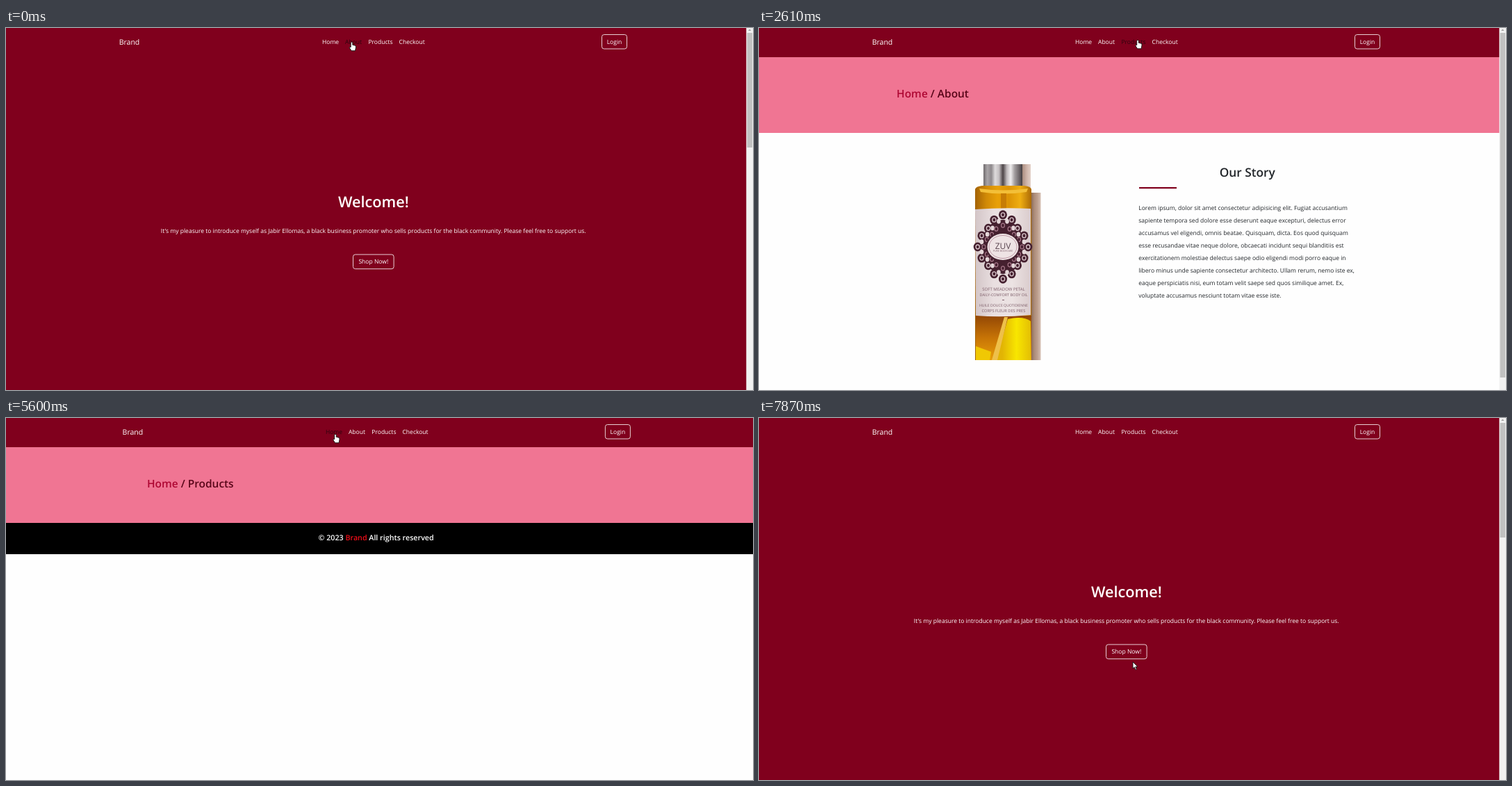
An HTML page with a canvas for the animation above (8000 ms loop, 1075x521 px).

```html
<!DOCTYPE html>
<html lang="en">
<head>
<meta charset="utf-8">
<title>Shop walkthrough</title>
<style>
  html, body { margin: 0; width: 100%; height: 100%; overflow: hidden; background: #fefefe; }
  canvas { display: block; }
</style>
</head>
<body>
<canvas id="stage" width="1075" height="521"></canvas>
<script>
const ctx = document.getElementById('stage').getContext('2d');
const W = 1075, H = 521, LOOP = 8000;
const WINE = '#80001d', PINK = '#f07593', PAPER = '#fefefe', DARK = '#2b040d';
const BODY = 8.52;

// Pages: start time, kind, colour of the hovered link while it fades, fade end
const pages = [
  { at: 0, kind: 'home', fade: DARK, until: 0 },
  { at: 500, kind: 'about', fade: '#b5a1a7', until: 640 },
  { at: 3170, kind: 'products', fade: '#43202a', until: 3410 },
  { at: 5900, kind: 'home', fade: '#a58d94', until: 6020 }
];

// Pointer path: time, x, y
const path = [
  [0, 497.5, 20], [640, 497.5, 20], [1540, 680, 112], [2610, 545, 17],
  [3276, 545, 17], [4230, 763, 91], [5170, 511, 47], [5600, 474, 23],
  [6415, 474, 23], [7480, 565, 250], [7870, 538, 351], [8000, 538, 351]
];

// Spans in which the screen is refreshed: start, end, steps
const spans = [
  [500, 1500, 8], [1650, 2610, 8], [3410, 4080, 6], [4230, 5170, 8],
  [5320, 5600, 3], [6550, 7480, 8], [7600, 7870, 3]
];

const links = [['Home', 455, 24], ['About', 488, 24], ['Products', 521.4, 35], ['Checkout', 565.6, 37]];

const story = [
  'Lorem ipsum, dolor sit amet consectetur adipisicing elit. Fugiat accusantium',
  'sapiente tempora sed dolore esse deserunt eaque excepturi, delectus error',
  'accusamus vel eligendi, omnis beatae. Quisquam, dicta. Eos quod quisquam',
  'esse recusandae vitae neque dolore, obcaecati incidunt sequi blanditiis est',
  'exercitationem molestiae delectus saepe odio eligendi modi porro eaque in',
  'libero minus unde sapiente consectetur architecto. Ullam rerum, nemo iste ex,',
  'eaque perspiciatis nisi, eum totam velit saepe sed quos similique amet. Ex,',
  'voluptate accusamus nesciunt totam vitae esse iste.'
];

const hand = new Path2D('M-1.3 1.2Q0-.9 1.3 1.2V4.3L5 5.2Q6.2 5.7 6 8L5 12.8H-.4L-3 8.8Q-3.7 6.8-1.3 7.6Z');
const arrow = new Path2D('M0 0V9.6L2.2 7.6L3.8 11.4L5.4 10.7L3.8 7H6.9Z');

function rect(x, y, w, h, color) {
  ctx.fillStyle = color;
  ctx.fillRect(x, y, w, h);
}

function shape(d, color) {
  ctx.fillStyle = color;
  ctx.fill(new Path2D(d));
}

function ellipse(x, y, rx, ry, color, line) {
  ctx.beginPath();
  ctx.ellipse(x, y, rx, ry, 0, 0, Math.PI * 2);
  if (line) {
    ctx.strokeStyle = color;
    ctx.lineWidth = line;
    ctx.stroke();
  } else {
    ctx.fillStyle = color;
    ctx.fill();
  }
}

function blend(x0, y0, x1, y1, ...colors) {
  const g = ctx.createLinearGradient(x0, y0, x1, y1);
  colors.forEach((c, i) => g.addColorStop(i / (colors.length - 1), c));
  return g;
}

// Returns the x at which the text ends
function text(str, x, y, color = '#fff', size = BODY, weight = 400, align = 'left') {
  ctx.font = `${weight} ${size}px "Open Sans", "Noto Sans", sans-serif`;
  ctx.textAlign = align;
  ctx.fillStyle = color;
  ctx.fillText(str, x, y);
  return x + ctx.measureText(str).width;
}

function button(label, x, y, w, h) {
  ctx.strokeStyle = '#f3e6e9';
  ctx.lineWidth = 0.9;
  ctx.beginPath();
  ctx.roundRect(x, y, w, h, 3.2);
  ctx.stroke();
  text(label, x + w / 2, y + h / 2 + 3.1, '#fff', BODY, 500, 'center');
}

function nav(shift, hovered, color) {
  rect(0, 0, W, 42, WINE);
  text('Brand', 162.7 + shift, 24, '#fff', 10.5, 500);
  for (const link of links) {
    text(link[0], link[1] + shift, 23.1, link === hovered ? color : '#fff', BODY, 500);
  }
  button('Login', 857.5 + shift, 9.5, 36, 20.5);
}

function banner(page, x) {
  rect(0, 42, W, 109, PINK);
  const end = text('Home', x, 100.4, '#ae0632', 15.45, 600);
  text(' / ' + page, end, 100.4, '#580518', 15.45, 600);
}

function scrollbar(bottom) {
  rect(1065.3, 0, 10, H, '#f1f1f1');
  rect(1066.5, 7, 7.5, bottom - 7, '#c1c1c1');
  shape('M1068 4L1070.2 1.6L1072.4 4Z', '#a0a0a0');
}

function ornament(cx, cy) {
  const plum = '#45202f', rose = '#a8788a';
  const ring = (rx, ry, turn, place) => {
    for (let i = 0; i < 16; i++) {
      const a = (i + turn) * Math.PI / 8, reach = 1 + 0.1 * Math.cos(4 * a);
      place(cx + rx * reach * Math.cos(a), cy + ry * reach * Math.sin(a));
    }
  };
  ring(33, 42, 0, (x, y) => ellipse(x, y, 6, 6.5, plum));
  ellipse(cx, cy, 31, 39, plum);
  ring(33, 42, 0, (x, y) => ellipse(x, y, 2.6, 3, '#d9c6cb', 1.3));
  ring(29, 35, 0.5, (x, y) => ellipse(x, y, 2.8, 3.4, '#e5d7d9'));
  ring(25, 28, 0, (x, y) => ellipse(x, y, 2.4, 3, rose, 1.2));
  ellipse(cx, cy, 24.5, 21.5, plum);
  ellipse(cx, cy, 22.5, 19, '#eee3e4');
  ellipse(cx, cy, 20, 16.5, rose, 0.7);
}

function bottle() {
  rect(379, 196, 12, 42, blend(379, 0, 391, 0, '#a98c7e', '#cdb3a8', '#e2d0c7'));
  rect(391, 237, 14.5, 241, blend(391, 0, 406, 0, '#85654f', '#ab8b79', '#bea08f', '#d9c4b8'));
  rect(323, 196, 56, 31, blend(323, 0, 379, 0, '#6f6b6d', '#a9a5a7', '#8d888b', '#dedbdc',
    '#c4bfc1', '#4c4447', '#bdb8ba', '#efedee', '#a39ea0', '#767073', '#453e41'));
  shape('M321 227H382Q391 228 392 232V478H311V232Q312 228 321 227Z',
    blend(311, 0, 392, 0, '#a36205', '#d18a06', '#e8a008', '#dc9306', '#efae12', '#ac6a06'));
  shape('M317 231Q352 236 387 231L385 236Q352 241 319 236Z', '#f3bf38');
  rect(348, 238, 8, 23, '#c77c05');

  shape('M312 414H392V478H312Z', blend(0, 414, 0, 478, '#934705', '#c77406', '#e99e08'));
  shape('M358 419Q380 414 391 422V478H341Z', blend(350, 0, 391, 0, '#e2b404', '#f8e600', '#e4bf04'));
  shape('M353 416H358L343 478H335Z', '#eec04a');
  shape('M312 458L334 466L332 478H312Z', '#f0c804');

  shape('M311 261Q351 258 391 260V413Q351 417 312 414Z',
    blend(311, 0, 391, 0, '#d3c5c7', '#e9dfe0', '#ece3e3', '#dacccd'));
  ornament(351, 315);
  const ink = '#7d5d69';
  text('ZUV', 351, 317.5, '#5b4651', 12, 500, 'center');
  text('PURE BODYCARE', 351, 322, ink, 3.6, 500, 'center');
  text('SOFT MEADOW PETAL', 352, 378, ink, 6, 500, 'center');
  text('DAILY-COMFORT BODY OIL', 352, 385.5, ink, 5.5, 500, 'center');
  rect(350, 391, 3, 1, ink);
  text('HUILE DOUCE QUOTIDIENNE', 352, 401, ink, 5.2, 500, 'center');
  text('CORPS FLEUR DES PRES', 352, 409, ink, 5.7, 500, 'center');
}

const draw = {
  home(hovered, color) {
    rect(0, 0, W, H, WINE);
    nav(0, hovered, color);
    text('Welcome!', 528.8, 258, '#fff', 21.7, 600, 'center');
    text("It's my pleasure to introduce myself as Jabir Ellomas, a black business promoter who sells " +
      'products for the black community. Please feel free to support us.', 528.7, 295.2, '#fff', BODY, 400, 'center');
    button('Shop Now!', 499.5, 326, 58.6, 20.7);
    scrollbar(172);
  },
  about(hovered, color) {
    rect(0, 0, W, H, PAPER);
    nav(0, hovered, color);
    banner('About', 198.1);
    bottle();
    text('Our Story', 702.8, 214, '#212529', 17.3, 600, 'center');
    rect(547, 229, 54, 2.2, WINE);
    story.forEach((line, i) => text(line, 546.3, 262.1 + i * 18.04, '#212529'));
    scrollbar(503);
  },
  products(hovered, color) {
    rect(0, 0, W, H, PAPER);
    nav(4.9, hovered, color);
    banner('Products', 203);
    rect(0, 151, W, 45, '#000');
    let x = text('© 2023 ', 449.6, 175.6, '#fff', 10.7, 600);
    x = text('Brand', x, 175.6, '#f00d18', 10.7, 600);
    text(' All rights reserved', x, 175.6, '#fff', 10.7, 600);
  }
};

// Time of the latest screen refresh
function refreshed(t) {
  let last = 0;
  for (const [from, to, steps] of spans) {
    if (t < from) break;
    const gap = (to - from) / (steps - 1);
    last = Math.min(to, from + Math.floor((t - from) / gap + 1e-6) * gap);
  }
  return last;
}

function pointerAt(t) {
  const i = Math.max(1, path.findIndex(p => p[0] >= t));
  const [t0, x0, y0] = path[i - 1], [t1, x1, y1] = path[i];
  const u = (t - t0) / (t1 - t0), e = u * u * (3 - 2 * u);
  return [x0 + (x1 - x0) * e, y0 + (y1 - y0) * e];
}

function pointer(x, y, isHand) {
  const form = isHand ? hand : arrow;
  ctx.save();
  ctx.translate(x, y);
  ctx.lineWidth = 0.9;
  ctx.lineJoin = 'round';
  ctx.strokeStyle = '#111';
  ctx.fillStyle = '#fff';
  ctx.fill(form);
  ctx.stroke(form);
  ctx.restore();
}

function render(t) {
  const page = pages.filter(p => t >= p.at).pop();
  const [x, y] = pointerAt(refreshed(t));
  const shift = page.kind === 'products' ? 4.9 : 0;
  const hovered = links.find(([, left, width]) =>
    y < 31 && x > left + shift - 4 && x < left + shift + width + 4);
  draw[page.kind](hovered, t < page.until ? page.fade : DARK);
  pointer(x, y, hovered);
}

function tick() {
  ctx.textRendering = 'geometricPrecision';
  render(performance.now() % LOOP);
  requestAnimationFrame(tick);
}
tick();
</script>
</body>
</html>
```
